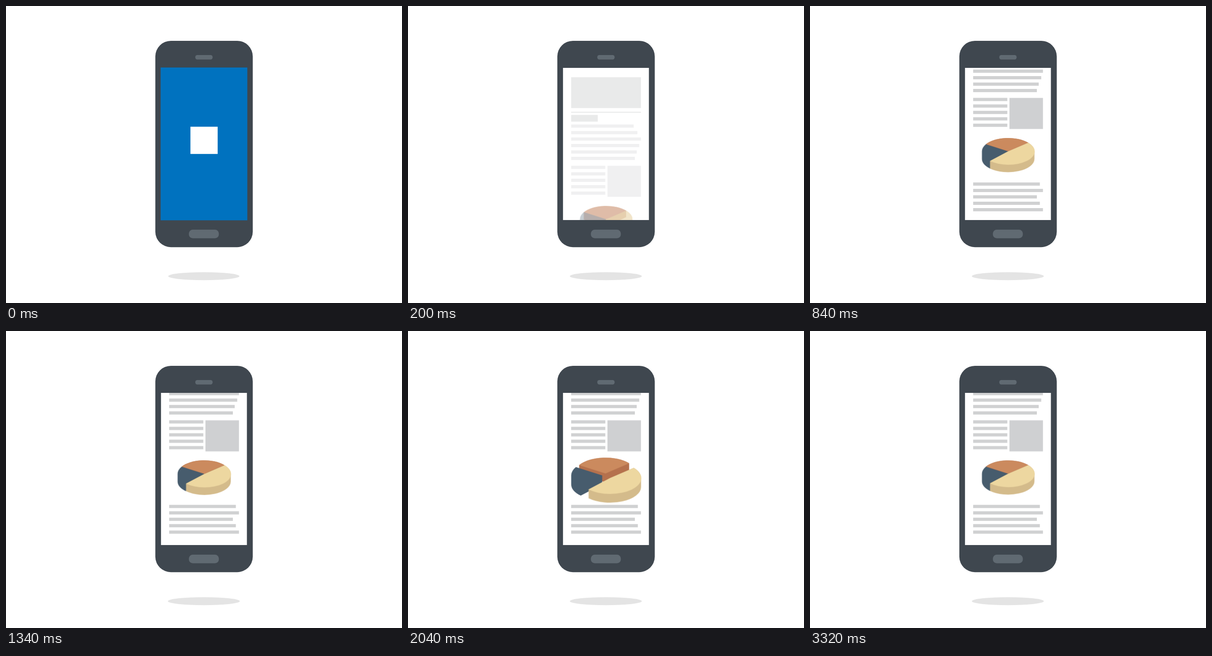
An HTML page for the animation above (3340 ms loop, 864x648 px).

```html
<!DOCTYPE html>
<html lang="en">
<head>
<meta charset="utf-8">
<title>Phone report</title>
<style>
  html, body { margin: 0; width: 100%; height: 100%; overflow: hidden; background: #fff; }
  svg { display: block; width: 100vw; height: 100vh; }

  .splash, .shadow, .scroll, .page rect, .page path, .slice {
    animation: 3340ms linear infinite;
  }

  .splash { animation-name: splash; animation-timing-function: step-end; }
  @keyframes splash { 0% { opacity: 1; } 1.19%, 100% { opacity: 0; } }

  .shadow { animation-name: shadow; animation-timing-function: step-end; }
  @keyframes shadow { 0% { rx: 77.7px; } 1.19%, 100% { rx: 78.6px; } }

  /* each shape fades on its own, so overlaps show through */
  .page rect, .page path { animation-name: fade; }
  @keyframes fade {
    0%, 1.018% { opacity: 0; animation-timing-function: cubic-bezier(.333, 0, .667, 0); }
    6.886% { opacity: .5; animation-timing-function: cubic-bezier(.333, 1, .667, 1); }
    12.754%, 100% { opacity: 1; }
  }

  .scroll { animation-name: scroll; }
  @keyframes scroll {
    0%, 15.898% { transform: translateY(0); animation-timing-function: cubic-bezier(.333, 0, .667, 0); }
    21.766% { transform: translateY(-76.85px); animation-timing-function: cubic-bezier(.333, 1, .667, 1); }
    27.635%, 100% { transform: translateY(-153.7px); }
  }

  /* slices drift apart and grow, then settle back */
  .slice { animation-name: burst; transform-origin: 0 0; }
  .orange { --x: -1.7px; --y: -.7px; }
  .blue { --x: -9px; --y: 3.6px; }
  .yellow { --x: 8.7px; --y: 9.7px; }
  @keyframes burst {
    0%, 39.671% {
      transform: translate(0, 0) scale(1);
      animation-timing-function: cubic-bezier(.333, .667, .667, 1);
    }
    65.868% {
      transform: translate(var(--x), var(--y)) scale(1.187);
      animation-timing-function: cubic-bezier(.333, 0, .667, .333);
    }
    82.335% {
      transform: translate(calc(var(--x) / 2), calc(var(--y) / 2)) scale(1.0935);
      animation-timing-function: cubic-bezier(.333, .667, .667, 1);
    }
    98.802%, 100% { transform: translate(0, 0) scale(1); }
  }

  .text { fill: none; stroke: #d0d1d2; stroke-width: 7; }
  .head { fill: #b8bcbd; }
</style>
</head>
<body>
<svg viewBox="0 0 864 648">
  <defs>
    <clipPath id="screen"><rect x="338.2" y="135" width="187.4" height="332"/></clipPath>
  </defs>

  <ellipse class="shadow" cx="431.6" cy="589.5" rx="78.6" ry="8.7" fill="#e4e4e4"/>
  <rect x="325.8" y="76" width="212.6" height="450.2" rx="34" fill="#3f474f"/>
  <rect x="413" y="107" width="37.8" height="9.8" rx="4.5" fill="#606a72"/>
  <rect x="399" y="488" width="65.4" height="18.7" rx="8.5" fill="#606a72"/>
  <rect x="338.2" y="135" width="187.4" height="332" fill="#fff"/>

  <g clip-path="url(#screen)">
    <g class="scroll">
      <g class="page">
        <rect class="head" x="356" y="155.4" width="152.3" height="67.3"/>
        <rect class="head" x="356" y="230.7" width="152.3" height="2.2"/>
        <rect class="head" x="356" y="237.7" width="58" height="14.6"/>
        <path class="text" d="M356 262.1H492.5M356 276.2H500.5M356 290.3H508.3M356 304.4H504.5M356 318.4H499M356 332.5H495"/>
        <path class="text" d="M356 352.1H430.5M356 366.2H430.5M356 380.2H430.5M356 394.3H430.5M356 408.3H430.5"/>
        <rect x="435.2" y="348.6" width="73.1" height="67.8" fill="#cfd0d2"/>
        <path class="text" d="M356 536.4H501.5M356 550.5H508.3M356 564.5H495M356 578.6H501.5M356 592.6H508.3"/>

        <g transform="translate(432.4 465.2)">
          <g class="slice orange">
            <path fill="#b5714d" d="M-48.6-15.4A57.3 29 0 0 1 43.8-18.7V-4.7L0 16.5L-48.6 1Z"/>
            <path fill="#cb8a5e" d="M-48.6-15.4A57.3 29 0 0 1 43.8-18.7L0 0Z"/>
          </g>
          <g class="slice blue">
            <path fill="#475c6d" d="M0 0L-48.6-15.4A57.3 29 0 0 0-57.3 0V16.5A57.3 29 0 0 0-39.6 37.4L0 16.5Z"/>
          </g>
          <g class="slice yellow">
            <path fill="#d4bb8b" d="M-39.6 21L0 0L43.8-18.7A57.3 29 0 0 1 57.3 0V16.5A57.3 29 0 0 1-39.6 37.4Z"/>
            <path fill="#edd7a0" d="M0 0L43.8-18.7A57.3 29 0 0 1-39.6 21Z"/>
          </g>
        </g>
      </g>
    </g>
  </g>

  <g class="splash">
    <rect x="337.4" y="134.2" width="189.1" height="333.4" fill="#0072bf"/>
    <rect x="402.4" y="263.4" width="59.4" height="59.4" fill="#fff"/>
  </g>
</svg>
</body>
</html>
```
